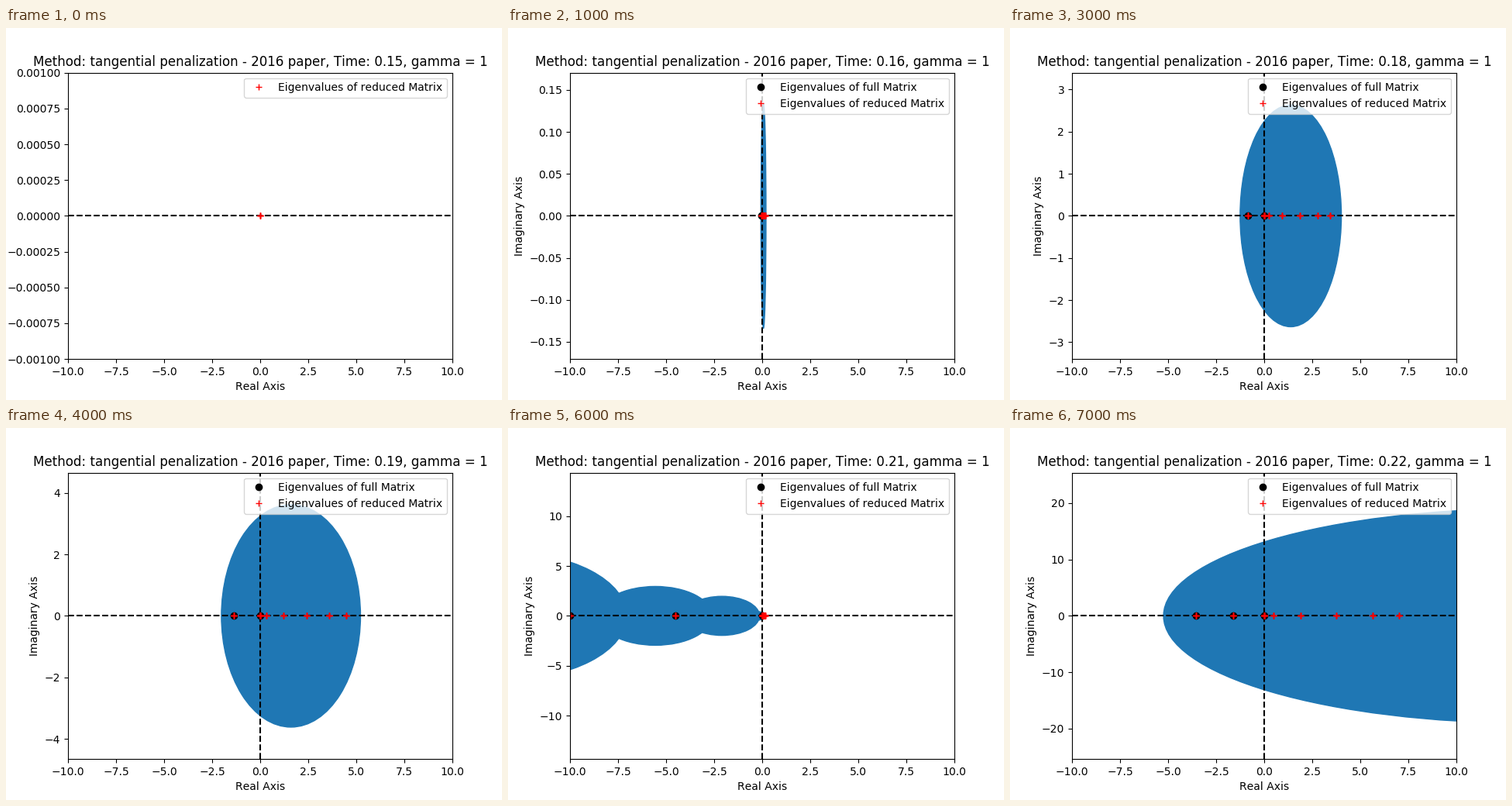
Animation of 640 by 480 pixels, one loop 8000 ms. Source, as a matplotlib script:

```python
import numpy as np
import matplotlib.pyplot as plt
from matplotlib.animation import FuncAnimation
from matplotlib.lines import Line2D
from matplotlib.patches import Circle

plt.rcParams.update({
    "font.family": "DejaVu Sans",
    "font.size": 10,
    "text.kerning_factor": 6,
    "text.hinting_factor": 9,  # whole pixel sizes for 10 and 12 pt
})

# y limit, then the (centre, radius) of each disc
KEYS = [
    (0,),
    (0.1706, (0.065, 0.134)),
    (1.344, (0.53, 1.055)),
    (3.403, (1.38, 2.635)),
    (4.66, (1.6, 3.62)),
    (4.915, (0.15, 3.9), (1.85, 3.95)),
    (14.36, (-13.47, 6.42), (-5.56, 2.95), (-2.1, 1.96), (-0.22, 0.42)),
    (25.4, (13.8, 19.04)),
]

fig, ax = plt.subplots(figsize=(6.4, 4.8), dpi=100)


def eigenvalues(discs):
    """Full and reduced spectrum inside the span of the discs."""
    if not discs:
        return [], [0]
    low = max(-10, 0.68 * min(c - r for c, r in discs))
    high = min(7.5, 0.92 * max(c + r for c, r in discs))
    full = [low, 0.45 * low, 0] if low < -2 else [low, 0]
    chain = high * np.sin(np.arange(6) * np.pi / 12) ** 2
    return full, [*full, *chain]


def points(values, style, repeats=1):
    xs = np.tile(values, repeats)
    ax.plot(xs, 0 * xs, style)


def handle(marker, color, kind):
    return Line2D([], [], ls="", marker=marker, color=color,
                  label=f"Eigenvalues of {kind} Matrix")


def draw(i):
    top, *discs = KEYS[i]
    full, reduced = eigenvalues(discs)
    ax.clear()
    for centre, radius in discs:
        ax.add_patch(Circle((centre, 0), radius, color="C0"))
    ax.plot([-10, 10], [0, 0], "k--")
    ax.plot([0, 0], [-top, top], "k--")
    points(full, "ko")
    points(reduced, "r+", repeats=4)  # coinciding values look bolder

    limit = top or 0.001
    ax.set(xlim=(-10, 10), ylim=(-limit, limit),
           xlabel="Real Axis", ylabel="Imaginary Axis")
    ax.set_title("Method: tangential penalization - 2016 paper, "
                 f"Time: {round(0.15 + i / 100, 2)}, gamma = 1")
    handles = [handle("o", "k", "full")] if full else []
    handles.append(handle("+", "r", "reduced"))
    ax.legend(handles=handles, loc="upper right")
    return []


anim = FuncAnimation(fig, draw, frames=len(KEYS), init_func=lambda: [],
                     interval=1000, repeat=True, repeat_delay=0)
plt.show()
```
